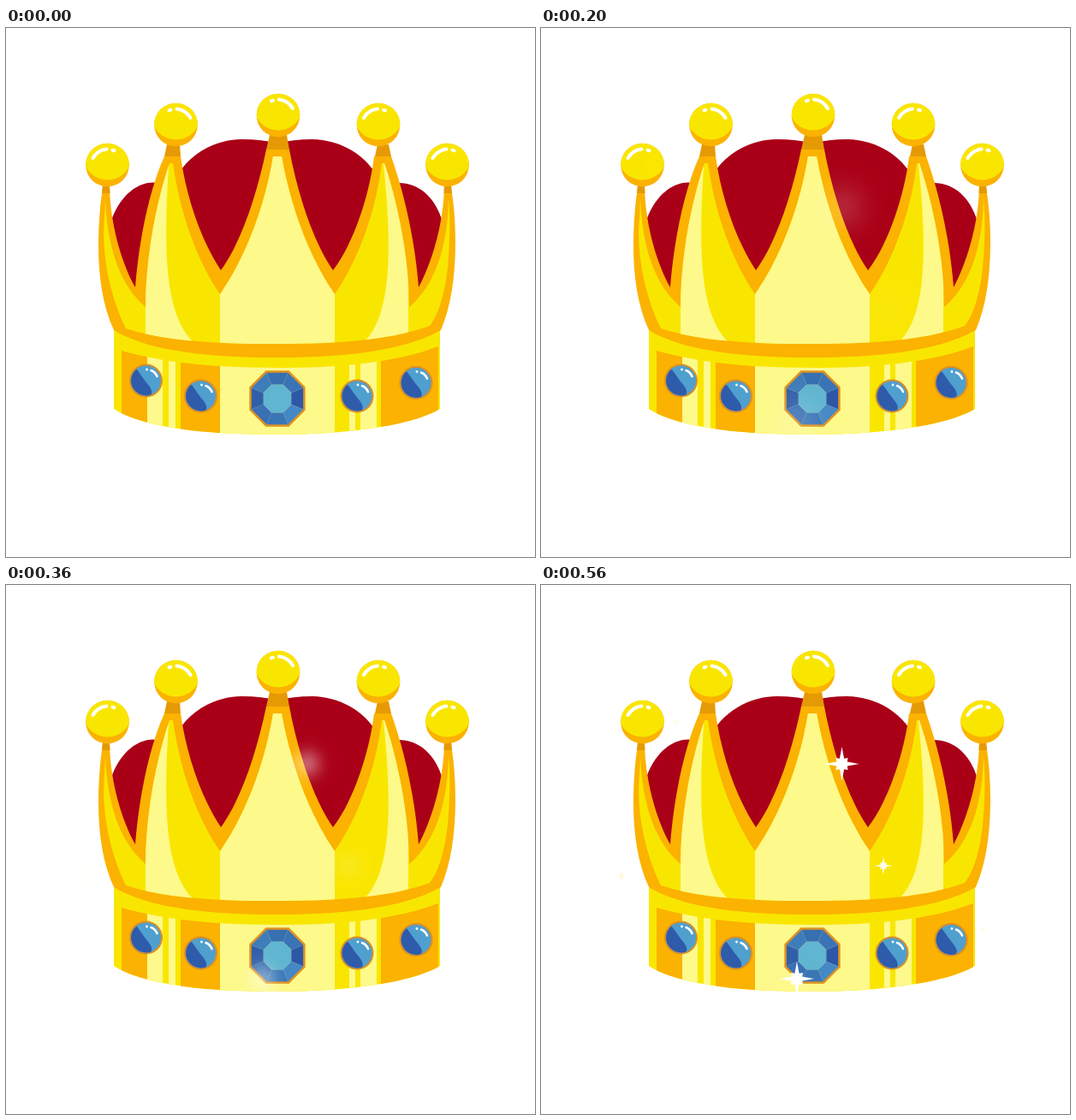
Write an HTML page that moves like this. It is 618x618 px and loops after 2.88 s.

```html
<!DOCTYPE html>
<html lang="en">
<head>
<meta charset="utf-8">
<title>Sparkling crown</title>
<style>
  html, body { margin: 0; width: 100%; height: 100%; overflow: hidden; background: #fff; }
  svg { display: block; width: 100vw; height: 100vh; }
  .gold { fill: #f9e600; }
  .pale { fill: #fdf98a; }
  .amber { fill: #fbb200; }
  .stem { fill: #e59a05; }
  .shine { fill: none; stroke: #fff; stroke-width: 4; stroke-linecap: round; }
</style>
</head>
<body>
<svg viewBox="0 0 618 618">
  <defs>
    <clipPath id="spikes">
      <path d="M116 200C118 250 130 298 163 326C163 270 175 205 191 158H195C203 215 222 270 250 311
        C282 265 303 205 312 150H322C332 205 352 265 384 311C412 270 432 215 439 158H442
        C458 205 471 270 471 326C504 298 516 250 517 200C519 220 519 245 516 280C513 310 505 335 495 348
        C445 366 380 369 317 369C254 369 189 367 140 351C122 315 111 265 115 222Z"/>
    </clipPath>
    <clipPath id="panels">
      <path d="M126 374C180 392 250 397 317 397C384 397 455 392 507 371V445C470 467 384 475 317 475C250 475 165 470 126 445Z"/>
    </clipPath>
    <clipPath id="round"><circle r="25.3"/></clipPath>
    <filter id="soft" filterUnits="userSpaceOnUse" x="0" y="0" width="618" height="618" color-interpolation-filters="sRGB">
      <feGaussianBlur id="blur" stdDeviation="20"/>
    </filter>
    <g id="ball">
      <circle r="25.3" class="amber"/>
      <g clip-path="url(#round)"><circle cy="-11" r="28.5" class="gold"/></g>
      <path class="shine" d="M1 -18.5Q12 -17 17 -8"/>
      <ellipse cx="-7" cy="-17" rx="3" ry="2" fill="#fff" transform="rotate(-20 -7 -17)"/>
    </g>
    <g id="gem">
      <circle r="19.5" fill="#d98f25"/>
      <circle r="17.5" fill="#4f9fcf"/>
      <path fill="#2f5bab" d="M-11 -13.6C-6 -7 -2 -1 2 4S8 13 6 16.400A17.5 17.5 0 0 1 -11 -13.6Z"/>
      <path class="shine" style="stroke-width:2.6" d="M6 -12Q11 -10 13 -5"/>
      <circle cx="1" cy="-13" r="1.4" fill="#fff"/>
    </g>
  </defs>

  <path fill="#aa0017" d="M122 228C132 196 155 177 178 181L205 165C222 142 250 130 275 130Q300 130 317 135
    Q335 130 358 130C390 131 415 146 430 167L457 181C482 180 503 198 511 230L490 330H140Z"/>

  <path class="gold" d="M126 345H507V445C470 467 384 475 317 475C250 475 165 470 126 445Z"/>
  <g id="stripes" clip-path="url(#panels)"></g>

  <path class="amber" d="M113 186H121C122 230 135 275 151 303C155 250 167 190 185 150H204C211 200 229 250 251 283
    C275 250 293 195 304 142H331C341 195 359 250 382 283C404 255 424 200 430 150H450
    C466 195 478 250 482 303C497 275 511 230 512 186H520C523 205 525 225 525 250
    C525 290 520 325 508 353C460 380 380 385 317 385C250 385 170 380 126 353
    C113 325 108 290 108 255C108 230 110 205 113 186Z"/>
  <g clip-path="url(#spikes)">
    <path class="gold" d="M100 140H530V380H100Z"/>
    <path class="pale" d="M163 120H193C183 250 182 335 222 370H163ZM250 140H384V372H250Z
      M440 150C451 250 452 335 418 367L470 370V120Z"/>
  </g>

  <path class="stem" d="M113 183H121L121.500 193H112ZM188 136H203L204 150H185ZM308 125H328L331 142H304Z
    M434 136H447L450 150H431ZM512 183H520L521 193H511.500Z"/>
  <g id="balls"></g>
  <g id="gems"></g>
  <g id="sparkles" filter="url(#soft)"></g>
</svg>
<script>
const LOOP = 2880, STEP = 40, SHARP = 560;
const byId = id => document.getElementById(id);

function add(parent, tag, attrs) {
  const el = document.createElementNS('http://www.w3.org/2000/svg', tag);
  for (const key in attrs) el.setAttribute(key, attrs[key]);
  return parent.appendChild(el);
}

// Points on a ring, starting from an angle in degrees
function ring(cx, cy, count, start, radius) {
  return Array.from({ length: count }, (_, i) => {
    const a = (start + i * 360 / count) * Math.PI / 180, r = radius(i);
    return [(cx + r * Math.cos(a)).toFixed(2), (cy + r * Math.sin(a)).toFixed(2)];
  });
}

// Band stripes: left edge, right edge, class
[[135, 165, 'amber'], [165, 183, 'pale'], [190, 198, 'pale'], [204, 250, 'amber'],
 [250, 384, 'pale'], [401, 408, 'pale'], [414, 433, 'pale'], [438, 505, 'amber']]
  .forEach(([x, end, cls]) => add(byId('stripes'), 'rect', { x, y: 360, width: end - x, height: 120, class: cls }));

[[118.500, 160, -1], [198.500, 113, 1], [318, 102, 1], [435, 113, -1], [515.500, 160, -1]]
  .forEach(([x, y, flip]) => add(byId('balls'), 'use',
    { href: '#ball', transform: `translate(${x} ${y}) scale(${flip} 1)` }));

[[163.500, 412], [227.500, 430], [410, 430], [479, 414.500]]
  .forEach(([x, y]) => add(byId('gems'), 'use', { href: '#gem', x, y }));

// Faceted centre stone
const outer = ring(317, 433, 8, -112.5, () => 34);
const inner = ring(317, 433, 8, -112.5, () => 17.5);
['#3670b0', '#3a74b6', '#2d57a7', '#4488c6', '#3a76b6', '#3a70b4', '#3160aa', '#3f7cba']
  .forEach((fill, i) => {
    const j = (i + 1) % 8;
    add(byId('gems'), 'polygon', { points: [outer[i], outer[j], inner[j], inner[i]].join(' '), fill });
  });
add(byId('gems'), 'polygon', { points: inner.join(' '), fill: '#60b5d1' });
add(byId('gems'), 'polygon', { points: outer.join(' '), fill: 'none', stroke: '#de9120', 'stroke-width': 2.5 });

// Sparkles: x, y, radius, colour
const reach = [1, 0.34, 0.5, 0.34];
[[351.500, 209, 20, '#fff'], [299, 460, 20, '#fff'], [400, 328, 10.500, '#fffdf0'],
 [94, 340, 8, '#fffae3'], [158, 160, 7, '#fffbe8'], [516, 402, 5, '#fffbe8']]
  .forEach(([x, y, r, fill]) => add(byId('sparkles'), 'polygon',
    { points: ring(x, y, 16, -90, i => r * reach[i % 4]).join(' '), fill }));

const sparkles = byId('sparkles'), blur = byId('blur');
const start = performance.now();

// Sparkles come into focus in fixed steps, then hold
function draw(now) {
  const time = Math.max(0, now - start) % LOOP;
  const step = Math.min(SHARP, Math.floor(time / STEP) * STEP);
  const sigma = (SHARP - step) / 20;
  sparkles.style.display = step ? '' : 'none';
  if (sigma) {
    blur.setAttribute('stdDeviation', sigma);
    sparkles.setAttribute('filter', 'url(#soft)');
  } else {
    sparkles.removeAttribute('filter');
  }
  requestAnimationFrame(draw);
}
draw(start);
</script>
</body>
</html>
```
